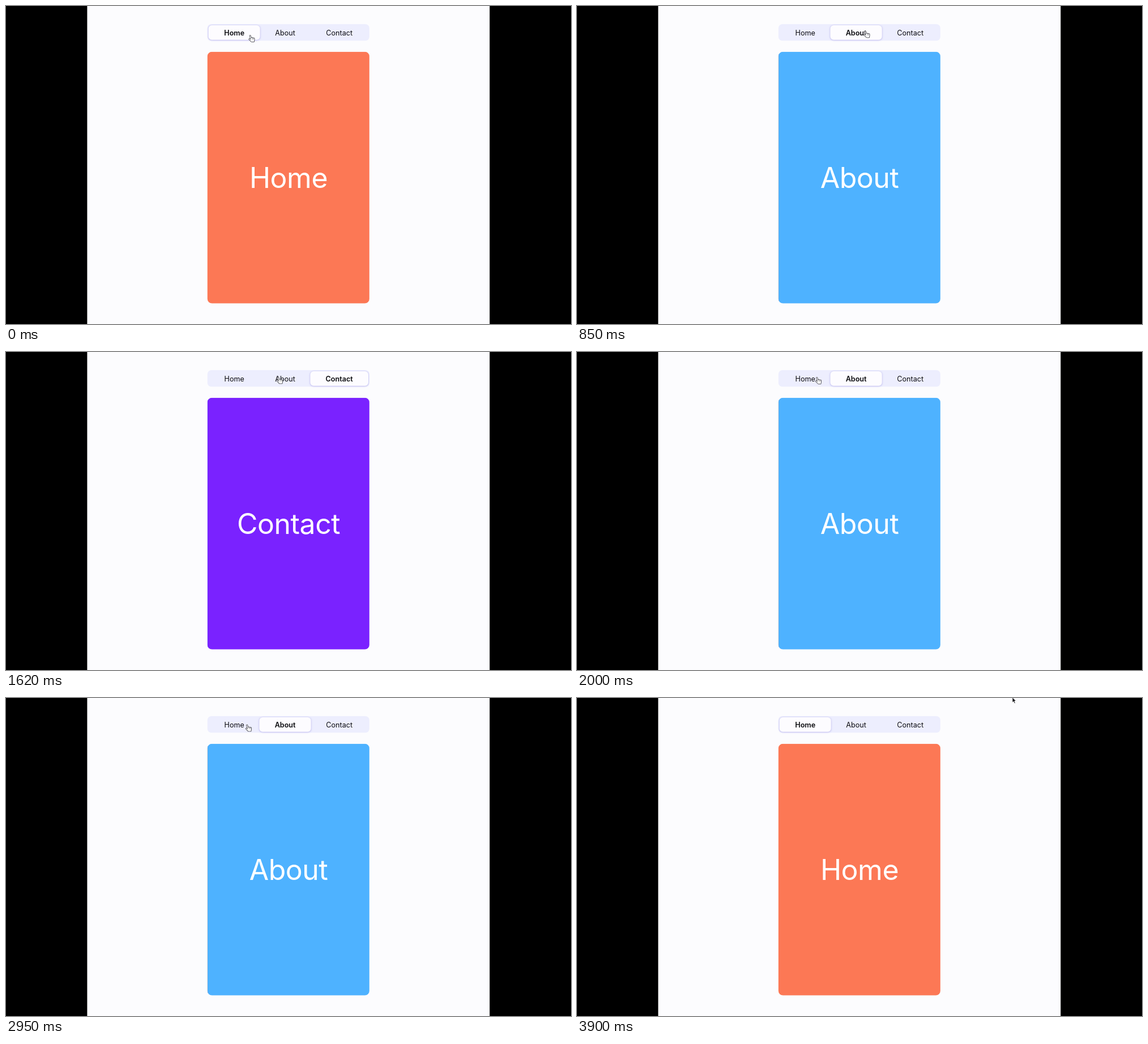
Animation, 998 px wide and 561 px high, one loop 4310 ms. Source, as an HTML page with a canvas:

```html
<!DOCTYPE html>
<html lang="en">
<head>
<meta charset="utf-8">
<title>Tabs</title>
<style>
  html, body { margin: 0; width: 100%; height: 100%; overflow: hidden; background: #000; }
  canvas { display: block; width: 998px; height: 561px; }
</style>
</head>
<body>
<canvas id="stage" width="998" height="561"></canvas>
<script>
const ctx = document.getElementById('stage').getContext('2d');
const LOOP = 4310;
const SLIDE = 250, DELAY = 35;   // panel slide after a click
const TRAVEL = 170, REST = 90;   // pointer trip, then a pause before the click
const PANEL = { x: 355.8, y: 80.7, w: 286, h: 444 };
const TAB_SIZE = 12.6, TITLE_SIZE = 50;

const tabs = [
  { name: 'Home', color: '#fc7855' },
  { name: 'About', color: '#4eb2ff' },
  { name: 'Contact', color: '#7a22ff' }
];

const home = { x: 428, y: 50.5 };
const clicks = [
  { at: 355, tab: 1, x: 506, y: 43 },
  { at: 1215, tab: 2, x: 556, y: 45 },
  { at: 1720, tab: 1, x: 477, y: 43 },
  { at: 2090, tab: 0, x: 420.5, y: 43.5 },
  { at: 2678, tab: 1, x: 474.5, y: 47.5 },
  { at: 3051, tab: 0, x: 422, y: 46 }
];
const exit = { at: 3435, x: 768.5, y: -2 };

const mix = (a, b, k) => a + (b - a) * k;
const clamp = p => Math.min(1, Math.max(0, p));
const smooth = p => p * p * (3 - 2 * p);

// CSS "ease": solve cubic-bezier(.25, .1, .25, 1) by bisection
function ease(p) {
  if (p <= 0 || p >= 1) return clamp(p);
  const curve = (s, a, b) => 3 * a * s * (1 - s) ** 2 + 3 * b * s * s * (1 - s) + s ** 3;
  let lo = 0, hi = 1;
  for (let i = 0; i < 20; i++) {
    const s = (lo + hi) / 2;
    if (curve(s, .25, .25) < p) lo = s; else hi = s;
  }
  return curve(lo, .1, 1);
}

function setFont(size, weight) {
  ctx.font = `${weight} ${size}px Inter, Arial, sans-serif`;
}

// Each tab is as wide as its text plus an equal share of the free space
function layoutTabs() {
  setFont(TAB_SIZE, 400);
  const inner = PANEL.w - 5;
  const widths = tabs.map(tab => ctx.measureText(tab.name).width);
  const padding = (inner - widths.reduce((a, b) => a + b)) / tabs.length;
  let x = PANEL.x + 2.5;
  tabs.forEach((tab, i) => {
    tab.x = x;
    tab.w = widths[i] + padding;
    x += tab.w;
  });
}

function stateAt(t) {
  let active = 0, scroll = 0;
  for (const { at, tab } of clicks) {
    if (t < at) break;
    active = tab;
    scroll = mix(scroll, tab, ease((t - at - DELAY) / SLIDE));
  }
  return { active, scroll };
}

// Height trails behind the sideways motion, which bends each trip
function pointerAt(t) {
  let { x, y } = home;
  for (const stop of [...clicks, exit]) {
    const k = smooth(clamp((t - stop.at + REST + TRAVEL) / TRAVEL));
    x = mix(x, stop.x, k);
    y = mix(y, stop.y, k ** 4);
  }
  return { x, y };
}

function round(x, y, w, h, r) {
  ctx.beginPath();
  ctx.roundRect(x, y, w, h, r);
}

function label(text, x, y, color) {
  ctx.textAlign = 'center';
  ctx.fillStyle = color;
  ctx.fillText(text, x, y);
}

function drawTabs(active) {
  round(PANEL.x, 32, PANEL.w, 29.3, 7);
  ctx.fillStyle = '#edeefe';
  ctx.fill();

  const tab = tabs[active];
  ctx.save();
  ctx.shadowColor = 'rgba(120, 110, 215, .55)';
  ctx.shadowBlur = 3;
  ctx.shadowOffsetY = .5;
  round(tab.x - .7, 34, tab.w + 1.4, 25.8, 6);
  ctx.fillStyle = '#fdfcff';
  ctx.fill();
  ctx.restore();

  tabs.forEach((t, i) => {
    setFont(TAB_SIZE, i === active ? 600 : 400);
    label(t.name, t.x + t.w / 2, 51.5, '#0b0b0f');
  });
}

function drawPanel(scroll) {
  const { x, y, w, h } = PANEL;
  ctx.save();
  round(x, y, w, h, 8);
  ctx.clip();
  setFont(TITLE_SIZE, 400);
  ctx.letterSpacing = '-0.5px';
  tabs.forEach((tab, i) => {
    const left = Math.round(x + (i - scroll) * w);
    ctx.fillStyle = tab.color;
    ctx.fillRect(left - (i ? 0 : 1), y, w + 2, h);
    label(tab.name, left + w / 2, 321.3, '#fff');
  });
  ctx.restore();
}

function drawHand() {
  const fingers = new Path2D('M3.2 2.2 L5.2 9 M2 8 L5.8 11.8 H9.6');
  for (let i = 0; i < 3; i++) {
    const x = 6.3 + 1.8 * i;
    fingers.moveTo(x, 6 + .4 * i);
    fingers.lineTo(x, 10);
  }
  ctx.lineCap = 'round';
  for (const [width, color] of [[3, '#35353c'], [1.4, '#fff']]) {
    ctx.lineWidth = width;
    ctx.strokeStyle = color;
    ctx.stroke(fingers);
  }
  ctx.fillStyle = '#fff';
  ctx.fillRect(5, 9, 5, 3);
}

function drawArrow() {
  const arrow = new Path2D('M.4 .6 V10.3 L2.6 8.3 L4.1 11.8 L5.9 11 L4.4 7.6 L7.3 7.4 Z');
  ctx.fillStyle = '#17171c';
  ctx.strokeStyle = '#fff';
  ctx.fill(arrow);
  ctx.stroke(arrow);
}

function drawPointer(t) {
  const { x, y } = pointerAt(t);
  ctx.save();
  ctx.translate(x, y);
  ctx.lineJoin = 'round';
  if (y < 30) drawArrow(); else drawHand();
  ctx.restore();
}

function draw(t) {
  const { active, scroll } = stateAt(t);
  ctx.fillStyle = '#000';
  ctx.fillRect(0, 0, 998, 561);
  ctx.fillStyle = '#fcfcfe';
  ctx.fillRect(143.4, 0, 710.9, 561);
  drawTabs(active);
  drawPanel(scroll);
  drawPointer(t);
}

layoutTabs();
const start = performance.now();
function tick() {
  draw((performance.now() - start) % LOOP);
  requestAnimationFrame(tick);
}
tick();
</script>
</body>
</html>
```
